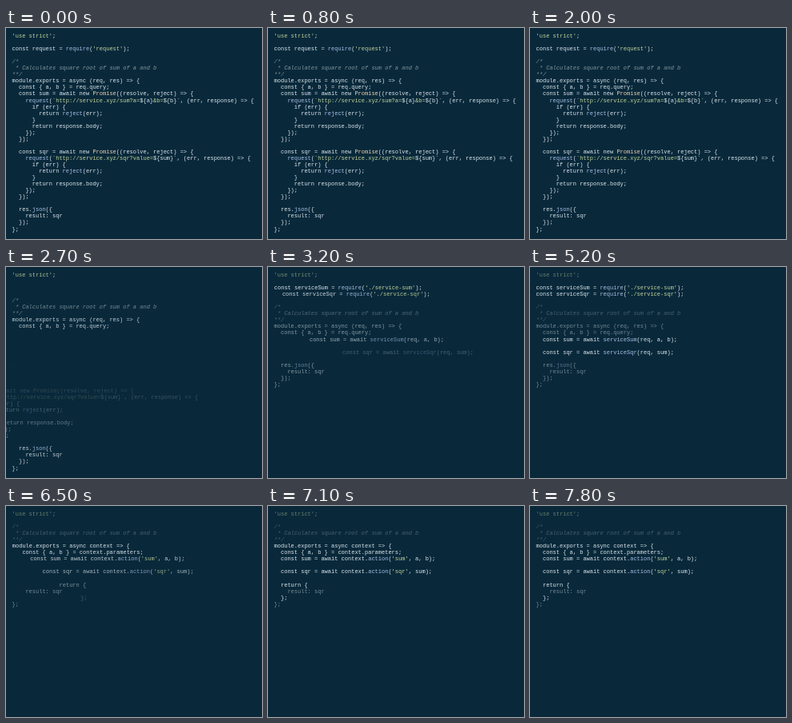
An HTML page with a canvas that plays this animation: 320x264 px, repeating every 8000 ms.

```html
<!DOCTYPE html>
<html lang="en">
<head>
<meta charset="utf-8">
<title>Code steps</title>
<style>
  html, body { margin: 0; width: 100%; height: 100%; overflow: hidden; background: #09293b; }
  canvas { display: block; width: 320px; height: 264px; }
</style>
</head>
<body>
<canvas id="stage"></canvas>
<script>
const W = 320, H = 264, LOOP = 8000;
const LEFT = 7.6, TOP = 12, PITCH = 8.05, SIZE = 7;
const SLIDE = 109, DIM = 0.5, LENGTH = 850;
const STARTS = [2490, 5790];
const COLORS = {
  plain: '#dde6ec', string: '#c6d69a', comment: '#82959d', func: '#a9c0e6', type: '#eed3b0'
};
const FONT = SIZE + 'px "Liberation Mono", "Courier New", monospace';

// Quoted strings, template pieces, type names and called functions.
const TOKEN = /('[^']*'|`http[^$]*|\$\{\w+\}|&b=|`|Promise|\w+(?=\())/;

const comment = ['/*', ' * Calculates square root of sum of a and b', '**/'];

const call = (name, query) => [
  `  const ${name} = await new Promise((resolve, reject) => {`,
  '    request(`http://service.xyz/' + name + '?' + query + '`, (err, response) => {',
  '      if (err) {',
  '        return reject(err);',
  '      }',
  '      return response.body;',
  '    });',
  '  });'
];

const head = ['module.exports = async (req, res) => {', '  const { a, b } = req.query;'];
const tail = ['  res.json({', '    result: sqr', '  });', '};'];

const steps = [
  ["'use strict';", '', "const request = require('request');", '',
    ...comment, ...head,
    ...call('sum', 'a=${a}&b=${b}'), '',
    ...call('sqr', 'value=${sum}'), '',
    ...tail],
  ["'use strict';", '',
    "const serviceSum = require('./service-sum');",
    "const serviceSqr = require('./service-sqr');", '',
    ...comment, ...head,
    '  const sum = await serviceSum(req, a, b);', '',
    '  const sqr = await serviceSqr(req, sum);', '',
    ...tail],
  ["'use strict';", '', ...comment,
    'module.exports = async context => {',
    '  const { a, b } = context.parameters;',
    "  const sum = await context.action('sum', a, b);", '',
    "  const sqr = await context.action('sqr', sum);", '',
    '  return {', '    result: sqr', '  };', '};']
].map(lines => lines.map((text, row) => ({ text, row, glow: 1 })));

// Pair equal lines of two steps from the bottom up; new lines stay bright.
function diff(prev, next) {
  const kept = [], enter = [], gone = new Set(prev);
  let end = prev.length;
  for (const line of [...next].reverse()) {
    let i = end - 1;
    while (i >= 0 && prev[i].text !== line.text) i--;
    if (i >= 0) {
      end = i;
      line.glow = DIM;
      kept.push([prev[i], line]);
      gone.delete(prev[i]);
    } else {
      enter.unshift(line);
    }
  }
  return { kept, enter, exit: [...gone].filter(line => line.text) };
}
const changes = [diff(steps[0], steps[1]), diff(steps[1], steps[2])];

const canvas = document.getElementById('stage');
const ctx = canvas.getContext('2d');
const scale = window.devicePixelRatio || 1;
canvas.width = W * scale;
canvas.height = H * scale;

const clamp = v => Math.min(1, Math.max(0, v));
const mix = (a, b, k) => a + (b - a) * k;
const easeOut = p => 1 - (1 - p) * (1 - p);
const easeInOut = p => p < 0.5 ? 2 * p * p : 1 - 2 * (1 - p) * (1 - p);

// Progress of item i of n inside a phase whose items overlap.
const stagger = (k, i, n) => clamp(k * 1.8 - (n > 1 ? 0.8 * i / (n - 1) : 0));

function tokenColor(token) {
  if (/^['`&]/.test(token)) return COLORS.string;
  if (token === 'Promise') return COLORS.type;
  return token[0] === '$' ? COLORS.plain : COLORS.func;
}

function drawLine(text, row, alpha, dx = 0) {
  if (!text || alpha <= 0) return;
  const note = /^( ?\*|\/\*)/.test(text);
  const advance = ctx.measureText('0').width;
  const y = TOP + row * PITCH;
  let x = LEFT + dx;
  ctx.globalAlpha = alpha;
  ctx.font = (note ? 'italic ' : '') + FONT;
  // Splitting on a captured group puts the tokens at odd places.
  (note ? [text] : text.split(TOKEN)).forEach((part, i) => {
    ctx.fillStyle = note ? COLORS.comment : i % 2 ? tokenColor(part) : COLORS.plain;
    ctx.fillText(part, x, y);
    x += part.length * advance;
  });
  ctx.font = FONT;
}

function drawChange({ kept, enter, exit }, t) {
  const move = easeInOut(clamp((t - 0.35) / 0.3));
  for (const [a, b] of kept) {
    drawLine(b.text, mix(a.row, b.row, move), mix(a.glow, b.glow, t));
  }
  exit.forEach((line, i) => {
    const p = stagger(t / 0.35, i, exit.length);
    drawLine(line.text, line.row, line.glow * (1 - p), -SLIDE * p * p);
  });
  enter.forEach((line, i) => {
    const p = easeOut(stagger((t - 0.65) / 0.35, i, enter.length));
    drawLine(line.text, line.row, p, SLIDE * (1 - p));
  });
}

function draw(time) {
  ctx.setTransform(scale, 0, 0, scale, 0, 0);
  ctx.globalAlpha = 1;
  ctx.fillStyle = '#09293b';
  ctx.fillRect(0, 0, W, H);
  ctx.font = FONT;
  const i = time < STARTS[1] ? 0 : 1;
  drawChange(changes[i], clamp((time - STARTS[i]) / LENGTH));
}

const begin = performance.now();
function tick() {
  draw((performance.now() - begin) % LOOP);
  requestAnimationFrame(tick);
}
tick();
</script>
</body>
</html>
```
